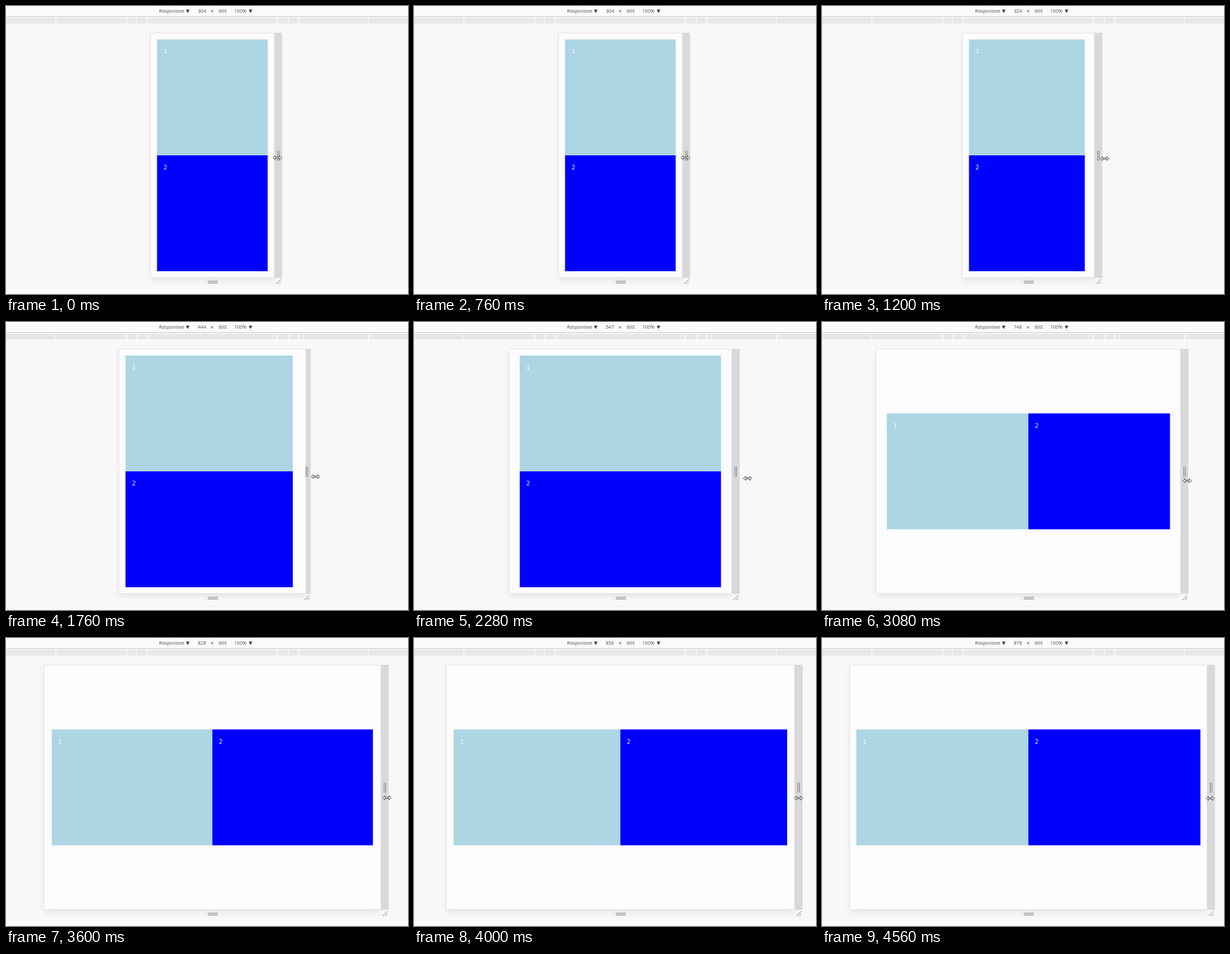
These frames come from a looping animation (600 px wide and 430 px high, 5000 ms). An HTML page:

```html
<!DOCTYPE html>
<html lang="en">
<head>
<meta charset="utf-8">
<title>Responsive resize</title>
<style>
  html, body { margin: 0; width: 100%; height: 100%; overflow: hidden; background: #f8f7f9; }
  svg { display: block; width: 600px; height: 430px; }
  .bar { font: 7.1px "Open Sans", "Noto Sans", sans-serif; fill: #4c4c4e; }
  .num { font: 9.2px "DejaVu Sans", sans-serif; fill: #fff; fill-opacity: .92; }
  .grip { stroke: #858587; fill: none; }
</style>
</head>
<body>
<svg viewBox="0 0 600 430">
  <defs>
    <filter id="soft" x="-10%" y="-10%" width="120%" height="120%"><feGaussianBlur stdDeviation="4"/></filter>
  </defs>
  <rect width="600" height="430" fill="#f8f7f9"/>
  <rect width="600" height="15" fill="#fcfbfc"/>
  <rect y="15" width="600" height="1" fill="#cfced1"/>
  <rect y="17.5" width="600" height="8.5" fill="#e7e6e8"/>
  <path d="M74.5 16.5V27M180.5 16.5V27M194.5 16.5V27M211 16.5V27M404.5 16.5V27M421.5 16.5V27M437 16.5V27M541 16.5V27" stroke="#fafafb" stroke-width="1.5"/>
  <g class="bar">
    <text x="228.5" y="10.4">Responsive</text>
    <text id="label" x="286.3" y="10.4"></text>
    <text x="305.2" y="10.9" font-size="8.5">×</text>
    <text x="317.3" y="10.4">600</text>
    <text x="340.8" y="10.4">100%</text>
  </g>
  <path d="M268.5 5.5h5.4l-2.7 5zM362.3 5.5h5.4l-2.7 5z" fill="#3c3c3e"/>

  <rect id="shadow" y="43" height="367" opacity=".07" filter="url(#soft)"/>
  <rect id="handle" y="40" width="12" height="366" fill="#d9d8da"/>
  <rect id="page" y="40.5" height="365" fill="#fdfcfe" stroke="#e3e2e5" stroke-width=".8"/>
  <g id="one">
    <rect height="173" fill="#acd6e3"/>
    <text class="num" x="9.6" y="21">1</text>
  </g>
  <g id="two">
    <rect height="173" fill="#0000fe"/>
    <text class="num" x="9.6" y="21">2</text>
  </g>

  <path class="grip" d="M301 411h15.5M301 413.5h15.5"/>
  <path id="grips" class="grip" d="M5 216v15M7.4 216v15M3 415l7-7M7 415l3-3"/>
  <path id="cursor" d="M-6.5 0l3.4-3v2.2h6.2v-2.2l3.4 3l-3.4 3v-2.2h-6.2v2.2z" fill="#fff" stroke="#333" stroke-width=".8"/>
</svg>
<script>
const LOOP = 5000, SCALE = 0.607, MID = 308, PAD = 9.7;
const LAG = 80;          // the layout trails the page, ms
const CENTRE_FROM = 500; // page widths where the layout changes
const ROW_FROM = 690;

// Key points: [time, value]
const WIDTH = [
  [700, 304], [1100, 315], [1200, 324], [1600, 426], [1700, 444], [2100, 496],
  [2700, 650], [3100, 748], [3300, 752], [3500, 820], [3900, 851], [4400, 878]
];
const CURSOR = [
  [700, 405], [1200, 422], [1700, 462], [2700, 522], [3100, 545], [3600, 568.5], [4400, 579.5]
];

const el = id => document.getElementById(id);
const move = (id, x, y = 0) => el(id).setAttribute("transform", `translate(${x} ${y})`);

function span(node, x, width) {
  node.setAttribute("x", x);
  node.setAttribute("width", width);
}

function at(track, t) {
  const i = track.findIndex(k => k[0] > t);
  if (i === 0) return track[0][1];
  if (i < 0) return track[track.length - 1][1];
  const [t0, a] = track[i - 1], [t1, b] = track[i];
  return a + (b - a) * (t - t0) / (t1 - t0);
}

// The page briefly runs ahead of the shown width
function pageWidth(t) {
  const p = Math.min(1, Math.max(0, (t - 1400) / 600));
  return at(WIDTH, t) + 15 * Math.sin(Math.PI * p);
}

function placeBox(id, x, y, width) {
  move(id, x, y);
  span(el(id).firstElementChild, 0, width);
}

function draw(t) {
  const shown = at(WIDTH, t), page = pageWidth(t);
  const half = page * SCALE / 2;
  const edge = MID + shown * SCALE / 2;
  const inner = pageWidth(t - LAG) * SCALE - 2 * PAD;
  const left = page > CENTRE_FROM ? MID - inner / 2 : MID - half + PAD;
  const x = at(CURSOR, t);

  el("label").textContent = Math.round(shown);
  span(el("page"), MID - half, half * 2);
  span(el("shadow"), MID - half, half * 2);
  move("handle", edge);
  move("grips", edge);
  move("cursor", x, 226.5 + (x - 405) * 0.0745);

  const row = page > ROW_FROM;
  const w = row ? inner / 2 : inner;
  placeBox("one", left, row ? 136.5 : 50, w);
  placeBox("two", row ? left + w : left, row ? 136.5 : 223, w);
}

// Ten refreshes a second, seen on a 25 fps grid
function frame() {
  const shot = Math.floor(performance.now() % LOOP / 40) * 40;
  draw(Math.floor((shot + 20) / 100) * 100 % LOOP);
  requestAnimationFrame(frame);
}
frame();
</script>
</body>
</html>
```
